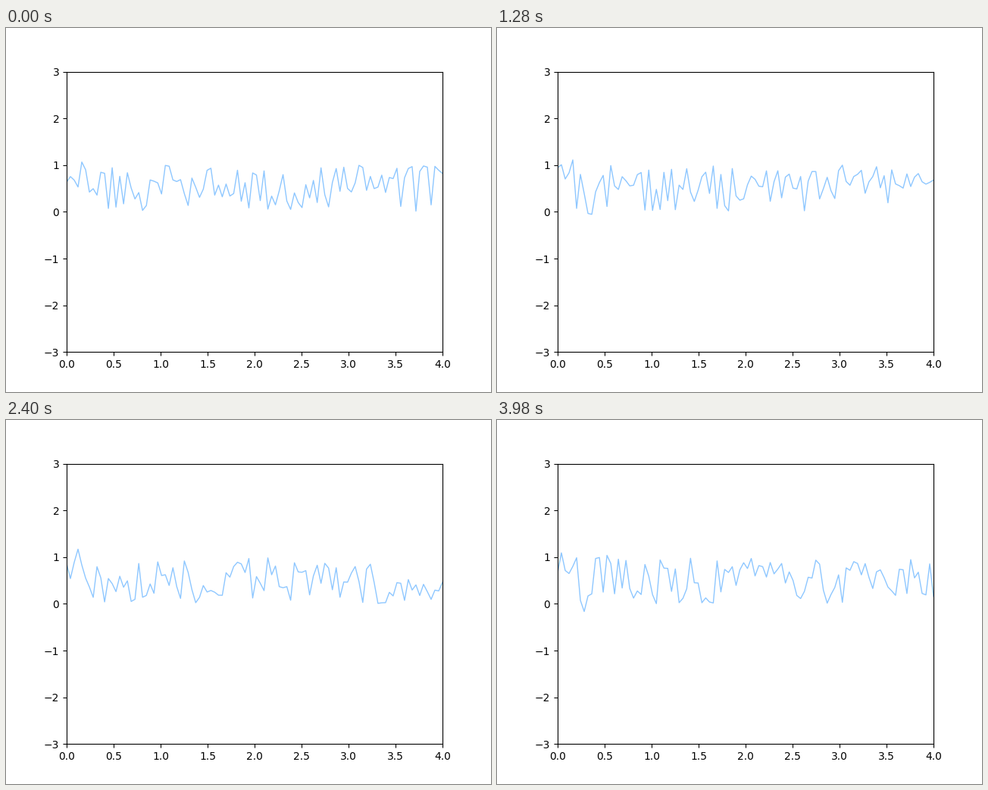
Recreate the animation shown at these times as a matplotlib script. Size 640 px wide and 480 px high, loop 4 s.

```python
import numpy as np
import matplotlib.pyplot as plt
from matplotlib.animation import FuncAnimation

FRAMES = 200
INTERVAL = 20  # ms

x = np.linspace(0, 4, 100)
wave = np.exp(-5 * x) * np.sin(5 * np.pi * x)

fig, ax = plt.subplots(figsize=(6.4, 4.8), dpi=100)
ax.set_xlim(0, 4)
ax.set_ylim(-3, 3)
line, = ax.plot([], [], color="dodgerblue", alpha=0.5, lw=1)


def update(frame):
    # Fresh uniform noise on a damped sine, seeded so each loop repeats
    noise = np.random.default_rng(frame).random(x.size)
    line.set_data(x, wave + noise)
    return line,


anim = FuncAnimation(fig, update, frames=FRAMES, interval=INTERVAL,
                     init_func=lambda: update(0), repeat=True, repeat_delay=0)
plt.show()
```
